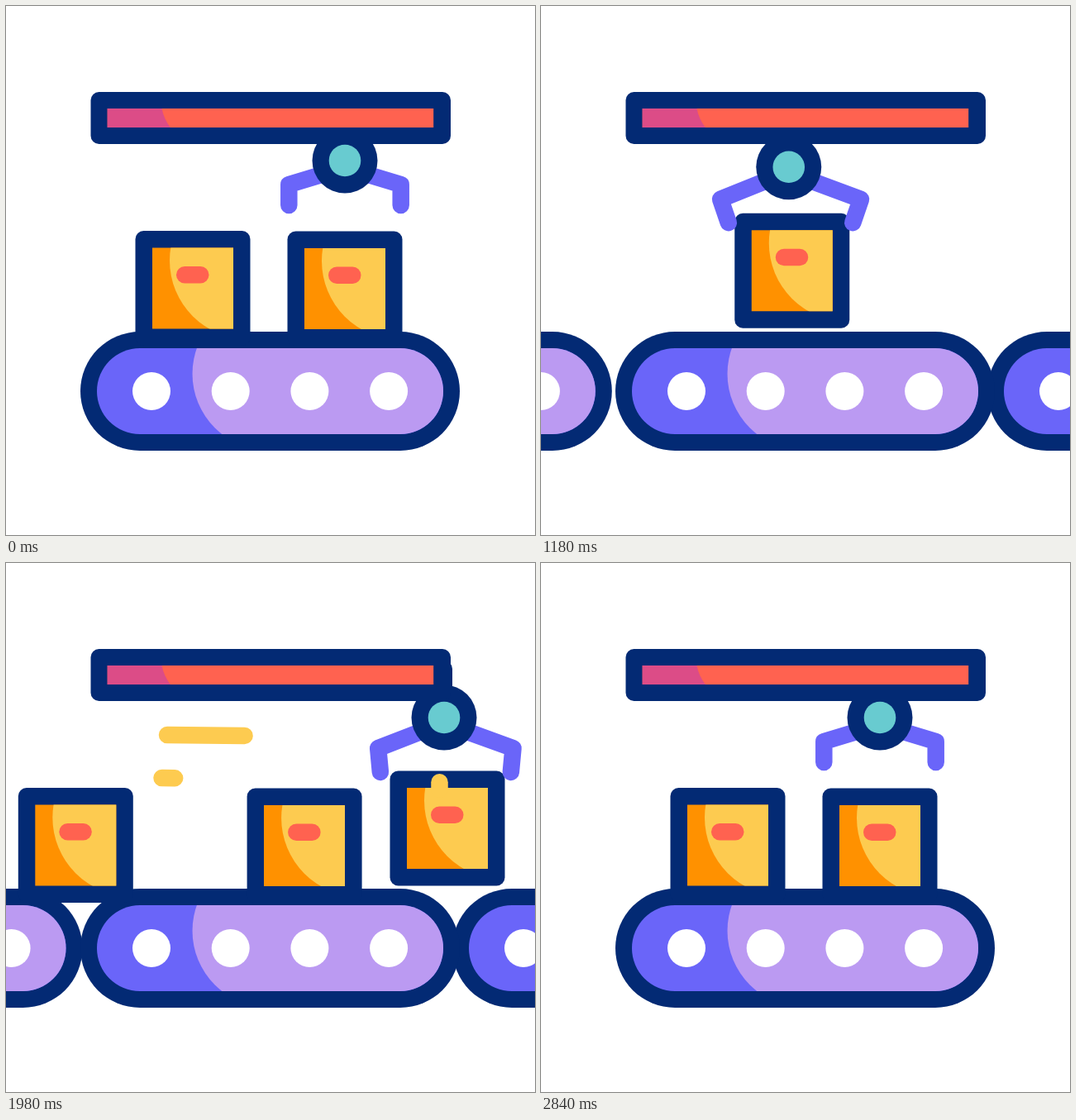
Recreate the animation shown at these times as an HTML page with a canvas. Size 640x640 px, loop 3020 ms.

```html
<!DOCTYPE html>
<html lang="en">
<head>
<meta charset="utf-8">
<title>Conveyor</title>
<style>
html, body { margin: 0; width: 100%; height: 100%; overflow: hidden; background: #fff; }
canvas { display: block; width: 640px; height: 640px; }
</style>
</head>
<body>
<canvas id="stage" width="640" height="640"></canvas>
<script>
const ctx = document.getElementById('stage').getContext('2d');
const LOOP = 3020;
const NAVY = '#032a74', RED = '#ff6250', PINK = '#dc4c87', YELLOW = '#fdcb50',
      ORANGE = '#ff9100', VIOLET = '#6a65f9', LILAC = '#bb9af2', TEAL = '#68cbd0';
const FLOOR = 272, LIFT = 29, CARRY = 308;

const clamp = (v, lo, hi) => Math.min(hi, Math.max(lo, v));
const mix = (a, b, f) => a + (b - a) * f;

// 0 to 1 between t0 and t1, on a sine.
const ease = (t, t0, t1) => (1 - Math.cos(Math.PI * clamp((t - t0) / (t1 - t0), 0, 1))) / 2;

// 0 to 1 at steady speed, with short ramps at both ends.
function glide(t, t0, t1, ramp) {
  const span = t1 - t0, u = clamp(t - t0, 0, span), left = span - u;
  const way = u < ramp ? u * u / (2 * ramp)
    : left < ramp ? span - ramp - left * left / (2 * ramp)
    : u - ramp / 2;
  return way / (span - ramp);
}

const carry = t => CARRY * glide(t, 903, 1913, 93);
const raise = t => LIFT * ease(t, 900, 1330);
const grip = t => ease(t, 740, 930) - ease(t, 1900, 2180);
// Degrees the claw tips point inwards.
const swing = t => -18 * ease(t, 620, 800) + 37 * ease(t, 780, 930)
  - 39 * ease(t, 1860, 2160) + 20 * ease(t, 2200, 2800);

function disc(x, y, r, color) {
  ctx.fillStyle = color;
  ctx.beginPath();
  ctx.arc(x, y, r, 0, Math.PI * 2);
  ctx.fill();
}

function pill(x, y, w, h, r, color) {
  ctx.fillStyle = color;
  ctx.beginPath();
  ctx.roundRect(x, y, w, h, r);
  ctx.fill();
}

function line(points, width, color) {
  ctx.strokeStyle = color;
  ctx.lineWidth = width;
  ctx.lineCap = ctx.lineJoin = 'round';
  ctx.beginPath();
  points.forEach(([x, y]) => ctx.lineTo(x, y));
  ctx.stroke();
}

function conveyor(dx) {
  ctx.save();
  ctx.translate(dx, 0);
  pill(90, 394, 459, 144, 72, NAVY);
  ctx.save();
  ctx.beginPath();
  ctx.roundRect(110, 414, 419, 104, 52);
  ctx.clip();
  ctx.fillStyle = VIOLET;
  ctx.fillRect(100, 404, 440, 124);
  disc(317.9, 445, 92.4, LILAC);
  ctx.fillRect(317, 404, 230, 124);
  ctx.restore();
  for (let i = 0; i < 4; i++) disc(176 + i * 95.7, 466, 23, '#fff');
  ctx.restore();
}

function box(x, y) {
  if (x < -138 || x > 640) return;
  ctx.save();
  ctx.translate(x, y);
  pill(-0.5, 0, 139, 139, 10, NAVY);
  ctx.save();
  ctx.beginPath();
  ctx.rect(20, 20.5, 98, 98);
  ctx.clip();
  ctx.fillStyle = ORANGE;
  ctx.fillRect(19, 19, 101, 101);
  disc(136, 36, 95, YELLOW);
  ctx.restore();
  pill(49, 43, 39.5, 20.5, 10.2, RED);
  ctx.restore();
}

function arm(x, y, side, t) {
  const g = grip(t), deg = swing(t), angle = deg * Math.PI / 180;
  const reach = mix(25, 30, g);
  const ex = x + side * (mix(67.7, 85, g) + 0.35 * Math.max(0, -deg)) + 2.3 * g;
  const ey = y + mix(29, 39, g);
  line([[x + side * 28, y + 17], [ex, ey],
        [ex - side * reach * Math.sin(angle), ey + reach * Math.cos(angle)]], 20.5, VIOLET);
}

function crane(t) {
  const x = 410 - 184 * ease(t, 220, 660) - 4 * ease(t, 660, 900)
    + carry(t) - 120 * ease(t, 2065, 2840);
  const y = 187 + LIFT * ease(t, 660, 900) - raise(t);
  line([[x, 128], [x, y - 25]], 20, NAVY);
  arm(x, y, -1, t);
  arm(x, y, 1, t);
  disc(x, y, 39.5, NAVY);
  disc(x, y, 19.3, TEAL);
}

function rail() {
  pill(102.5, 104, 435.5, 63, 10, NAVY);
  ctx.fillStyle = RED;
  ctx.fillRect(122.7, 124, 394.5, 23);
  ctx.fillStyle = PINK;
  ctx.beginPath();
  ctx.moveTo(122.7, 124);
  ctx.lineTo(188.5, 124);
  ctx.quadraticCurveTo(191, 137, 199, 147);
  ctx.lineTo(122.7, 147);
  ctx.fill();
}

// A dash whose head runs ahead of its tail along one straight path.
function streak(t, start, span, x0, y0, x1, y1) {
  if (t <= start || t >= start + span) return;
  const at = f => [mix(x0, x1, f), mix(y0, y1, f)];
  line([at(ease(t, start, start + span)), at(ease(t, start, start + span * 0.57))], 20.5, YELLOW);
}

function conveyors(t) {
  const leave = 112 * ease(t, 2440, 2820);
  conveyor(mix(562, 450, ease(t, 220, 660)) + leave);
  conveyor(mix(-552, -456.5, ease(t, 700, 1280)) - leave);
  conveyor(0);
}

function boxes(t) {
  box(mix(341, 650, ease(t, 220, 1046)), FLOOR + 0.5);
  box(mix(-150, 157, ease(t, 1392, 2515)), FLOOR);
  box(mix(-152, 341, ease(t, 1060, 2217)), FLOOR + 0.5);
  box(157 + carry(t) + 180 * ease(t, 1980, 2400),
      FLOOR - raise(t) + LIFT * ease(t, 1930, 2070));
}

function draw(t) {
  ctx.fillStyle = '#fff';
  ctx.fillRect(0, 0, 640, 640);
  conveyors(t);
  boxes(t);
  crane(t);
  rail();
  streak(t, 1418, 773, 280, 261.5, 188.5, 260);
  streak(t, 1700, 773, 354, 209.7, 130, 207.4);
  streak(t, 1930, 140, 524.5, 259.5, 524.5, 279.5);
}

const start = performance.now();
function tick() {
  draw((performance.now() - start) % LOOP);
  requestAnimationFrame(tick);
}
tick();
</script>
</body>
</html>
```
